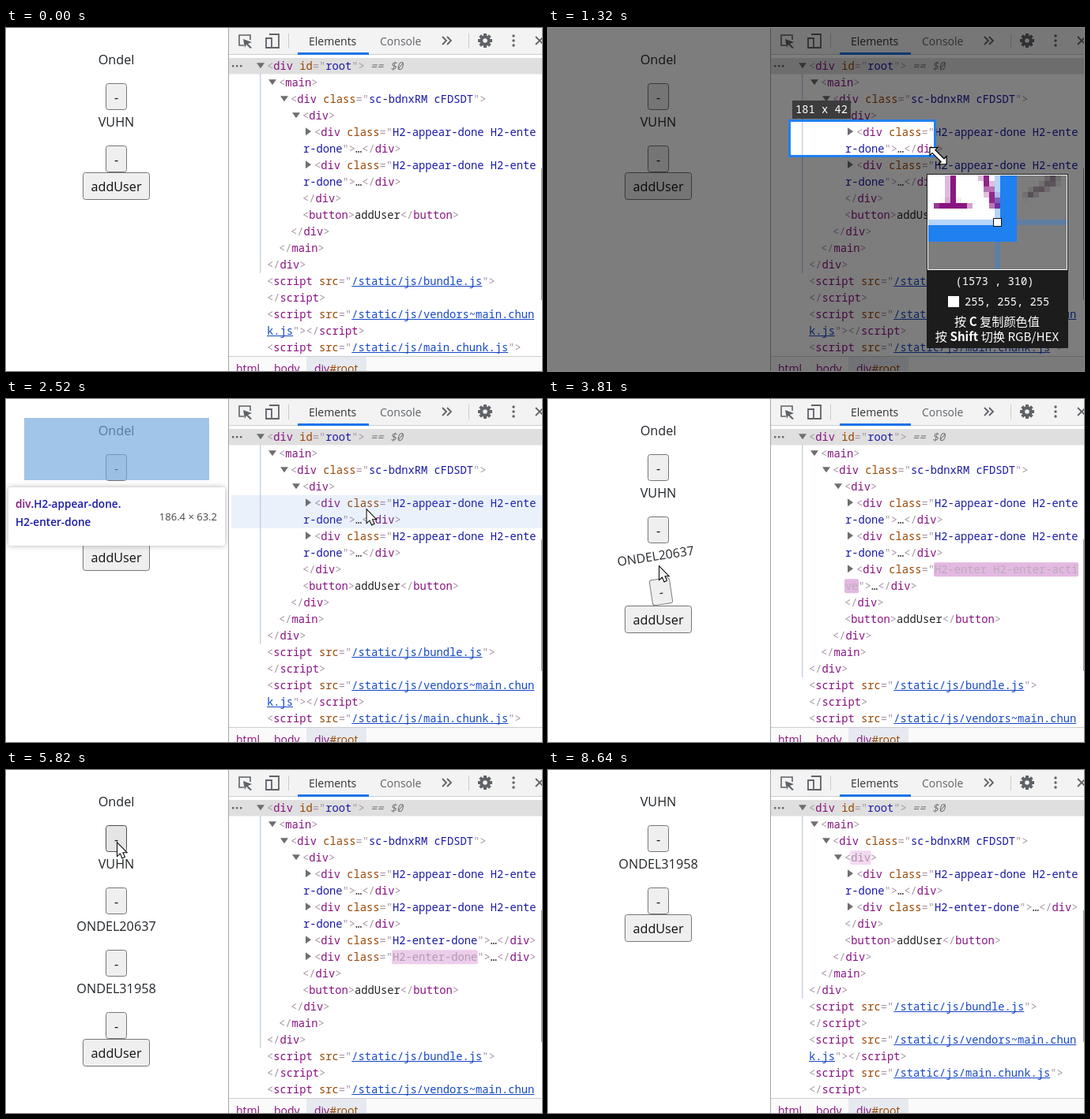
Recreate the animation shown at these times as an HTML page with a canvas. Size 678 by 435 pixels, loop 8.73 s.

```html
<!DOCTYPE html>
<html lang="en">
<head>
<meta charset="utf-8">
<title>List transitions</title>
<style>
html, body { margin: 0; width: 678px; height: 435px; overflow: hidden; background: #fff; }
canvas { display: block; }
</style>
</head>
<body>
<canvas id="stage" width="678" height="435"></canvas>
<script>
const cv = document.getElementById('stage'), g = cv.getContext('2d');
const LOOP = 8730, MOVE = 500, W = 678, H = 435;
const SANS = '"Open Sans", "Noto Sans", sans-serif';
const MONO = '13.75px "Noto Sans Mono", "DejaVu Sans Mono", monospace';
const CJK = '"Noto Sans CJK SC", "Noto Sans CJK", "Noto Sans", sans-serif';
const CH = 8.25, ROW = 21;
const MARK = '#a894a6', TAG = '#881280', ATTR = '#994500', VALUE = '#1a1aa6', LINK = '#1547c4';
const BLUE = '#1f80f0';

const users = [
  { name: 'Ondel', enter: -1e4, exit: 5967, cls: 'H2-appear-done H2-enter-done' },
  { name: 'VUHN', enter: -1e4, exit: 1e5, cls: 'H2-appear-done H2-enter-done' },
  { name: 'ONDEL20637', enter: 3323, exit: 7210, cls: 'H2-enter-done' },
  { name: 'ONDEL31958', enter: 4620, exit: 1e5, cls: 'H2-enter-done' }
];

// Pointer: time, x, y
const path = [
  [270, 560, 330], [760, 307, 119], [800, 307, 119], [870, 330, 124], [1840, 682, 207],
  [1900, 660, 200], [1960, 598, 191], [2250, 598, 191], [2420, 470, 141], [2680, 430, 141],
  [2910, 141, 213], [4150, 141, 213], [4450, 141, 280], [5130, 141, 280], [5600, 141, 93],
  [6810, 141, 93], [7150, 143, 157], [7710, 143, 157], [7930, 250, 217], [8060, 420, 172],
  [8330, 470, 172], [8460, 690, 172]
];

const clamp = (v, a = 0, b = 1) => Math.min(b, Math.max(a, v));
const lerp = (a, b, k) => a + (b - a) * k;
const mix = (a, b, k) => `rgb(${a.map((v, i) => Math.round(lerp(v, b[i], k)))})`;

// cubic-bezier(0, 0, .2, 1)
function easeOut(x) {
  let lo = 0, hi = 1;
  for (let i = 0; i < 24; i++) {
    const m = (lo + hi) / 2;
    if (.6 * m * m * (1 - m) + m ** 3 < clamp(x)) lo = m; else hi = m;
  }
  return lo * lo * (3 - 2 * lo);
}

function pointer(t) {
  let i = 0;
  while (i < path.length - 2 && t > path[i + 1][0]) i++;
  const [a, b] = [path[i], path[i + 1]], k = clamp((t - a[0]) / (b[0] - a[0])), s = k * k * (3 - 2 * k);
  return [lerp(a[1], b[1], s), lerp(a[2], b[2], s)];
}

function rect(x, y, w, h, fill) {
  g.fillStyle = fill;
  g.fillRect(x, y, w, h);
}

function round(x, y, w, h, r, fill, stroke) {
  g.beginPath();
  g.roundRect(x, y, w, h, r);
  g.fillStyle = fill;
  g.fill();
  if (stroke) { g.strokeStyle = stroke; g.lineWidth = 1; g.stroke(); }
}

function text(s, x, y, font, fill, align = 'left') {
  g.font = font;
  g.fillStyle = fill;
  g.textAlign = align;
  g.fillText(s, x, y);
}

function shape(d, x, y, fill, stroke, width = 1.3) {
  const p = new Path2D(d);
  g.save();
  g.translate(x, y);
  g.lineWidth = width;
  if (stroke) { g.strokeStyle = stroke; g.stroke(p); }
  if (fill) { g.fillStyle = fill; g.fill(p); }
  g.restore();
}

function button(label, x, y, w, h, over) {
  round(x + .5, y + .5, w - 1, h - 1, 3, over ? '#e5e5e5' : '#efefef', over ? '#4f4f4f' : '#767676');
  text(label, x + w / 2, y + h / 2 + 6.5, '16.2px ' + SANS, '#111', 'center');
}

function page(t, list, [px, py], live) {
  const over = (x, y, w, h) => live && px >= x && px < x + w && py >= y && py < y + h;
  list.forEach((u, i) => {
    const top = 24 + 79 * i, mid = top + 39.5;
    const k = t >= u.exit ? 1 - clamp((t - u.exit) / MOVE) : clamp((t - u.enter) / MOVE);
    g.save();
    g.globalAlpha = k;
    g.translate(140, mid);
    g.rotate(-2 * Math.PI * (1 - k));
    g.scale(k, k);
    g.translate(-140, -mid);
    text(u.name, 139.5, top + 22, '16.2px ' + SANS, '#212529', 'center');
    button('-', 126, top + 46, 27, 34, over(126, top + 46, 27, 34));
    g.restore();
  });
  const y = 25 + 79 * list.length;
  button('addUser', 97, y, 85, 35, over(97, y, 85, 35));
}

// Highlight of a freshly changed node: [background, text, alpha]
function flash(age) {
  if (age < 0 || age > 1400) return null;
  const k = easeOut(age / 1120);
  return [mix([158, 54, 153], [245, 219, 244], k), mix([255, 255, 255], [168, 148, 166], k),
    1 - easeOut((age - 1120) / 280)];
}

const open = (name, attr, value, style = {}, tagStyle = {}) => [['<', MARK], [name, TAG, tagStyle],
  ...(attr ? [[' ' + attr, ATTR], ['="', MARK], [value, style.link ? LINK : VALUE, style], ['"', MARK]] : []),
  ['>', MARK]];
const close = name => [['</', MARK], [name, TAG], ['>', MARK]];

function piece(s, x, y, color, { link, lit }) {
  const w = s.length * CH;
  if (lit) {
    g.globalAlpha = lit[2];
    round(x - 1, y - 9, w + 1.5, 18, 2, lit[0]);
    g.globalAlpha = 1;
    color = lit[1];
  }
  text(s, x, Math.round(y + 4.6), MONO, color);
  if (link) rect(x, Math.round(y + 6), w, 1, color);
}

// Draws one node with wrapping and returns the next row's y
function node(x, y, segs, arrow, hang = x, cols = 41) {
  if (arrow === 'v') shape('M-5-3H5L0 4Z', x - 8, y - 1, '#6e6e6e');
  if (arrow === '>') shape('M-3-5V5L4 0Z', x - 8, y - 1, '#6e6e6e');
  let c = 0, left = x;
  const wrap = () => { c = 0; left = hang; y += ROW; };
  segs.forEach(([s, color, style = {}], i) => {
    if (s === '</' && c + segs[i + 1][0].length + 3 > cols) wrap();
    while (s) {
      if (c >= cols) wrap();
      const part = s.slice(0, cols - c);
      piece(part, left + c * CH, y, color, style);
      c += part.length;
      s = s.slice(part.length);
    }
  });
  return y + ROW;
}

function tree(t, list, hover) {
  g.save();
  g.beginPath();
  g.rect(282, 36, 396, 377);
  g.clip();
  rect(282, 38, 396, 20.5, '#dfdfdf');
  for (const x of [287, 292, 297]) rect(x - 1, 47, 2.4, 2.4, '#666');
  let y = node(330, 48.3, open('div', 'id', 'root'), 'v');
  text('== $0', 461, 53, 'italic ' + MONO, '#777');
  y = node(345, y, open('main'), 'v');
  y = node(360, y, open('div', 'class', 'sc-bdnxRM cFDSDT'), 'v');
  const gone = Math.max(...users.map(u => u.exit + MOVE).filter(e => e <= t), -1e4);
  y = node(375, y, open('div', 0, 0, {}, { lit: flash(t - gone) }), 'v');
  list.forEach((u, i) => {
    let cls = u.cls, since = u.enter + MOVE, cols = 34;
    if (t >= u.exit) { cls = 'H2-exit H2-exit-active'; since = u.exit; cols = 33; }
    else if (t < since) { cls = 'H2-enter H2-enter-active'; since = u.enter; }
    const y0 = y, segs = [...open('div', 'class', cls, { lit: flash(t - since) }), ['…', '#222'], ...close('div')];
    y = node(390, y, segs, '>', 376, cols);
    if (i === hover) rect(285, y0 - 10.5, 393, y - y0, 'rgba(56,121,217,.1)');
  });
  y = node(375, y, close('div'));
  y = node(375, y, [...open('button'), ['addUser', '#222'], ...close('button')]);
  y = node(360, y, close('div'));
  y = node(345, y, close('main'));
  y = node(330, y, close('div'));
  rect(321, 58, 1.4, y - 10.5 - 58, '#c5d0e6');
  for (const file of ['bundle', 'vendors~main.chunk', 'main.chunk'])
    y = node(330, y, [...open('script', 'src', `/static/js/${file}.js`, { link: true }), ...close('script')]);
  g.restore();
}

function devtools(t, list, hover) {
  rect(281, 0, 397, H, '#fff');
  rect(281, 0, 397, 33, '#f3f3f3');
  rect(281, 33, 397, 1, '#cbcdd1');
  rect(369, 31, 90, 3, '#1a73e8');
  text('Elements', 383, 21.5, '14px ' + SANS, '#333');
  text('Console', 473, 21.5, '14px ' + SANS, '#5f6368');
  const ink = '#5f6368';
  shape('M-1 6H-7V-7H7V-1', 302, 16, null, ink, 1.6);
  shape('M-2-2L9 2 4 4 9 9 7 10 2 5 0 9Z', 302, 16, ink);
  shape('M-4-8H8V9H0M-8-3H-1V9H-8Z', 337, 16, null, ink, 1.8);
  shape('M-5-5L0 0-5 5M1-5L6 0 1 5', 557, 16, null, ink, 1.8);
  rect(357, 7, 1, 19, '#ccc');
  rect(585, 7, 1, 19, '#ccc');
  g.save();
  g.translate(606, 16);
  for (let i = 0; i < 8; i++) { rect(-2, -9, 4, 5, ink); g.rotate(Math.PI / 4); }
  g.restore();
  g.beginPath();
  g.arc(606, 16, 4.8, 0, 7);
  g.strokeStyle = ink;
  g.lineWidth = 4;
  g.stroke();
  for (const y of [10, 16, 22]) round(640.3, y - 1.7, 3.4, 3.4, 1.7, ink);
  shape('M-5-5L5 5M5-5L-5 5', 675, 16, null, ink, 1.8);

  tree(t, list, hover);
  rect(677, 178, 1, 167, '#9a9a9a');
  rect(281, 416, 397, 19, '#fafafa');
  rect(281, 416, 397, 1, '#cbcdd1');
  rect(380, 417, 76, 18, '#e6eaf0');
  text('html', 291, 436.5, '14px ' + SANS, TAG);
  text('body', 339, 436.5, '14px ' + SANS, TAG);
  text('div', 390, 436.5, '14px ' + SANS, TAG);
  const w = g.measureText('div').width;
  text('#root', 390 + w, 436.5, '14px ' + SANS, ATTR);
  rect(281, 0, 1, H, '#a3a5a8');
}

function tooltip(index, box, lines, textY) {
  const [x, y, w, h] = box, bold = '600 13.6px ' + SANS;
  rect(23, 24 + 79 * index, 234, 79, 'rgba(111,168,220,.66)');
  g.save();
  g.shadowColor = 'rgba(0,0,0,.3)';
  g.shadowBlur = 7;
  round(x, y, w, h, 3, '#fff');
  g.restore();
  lines.forEach((s, i) => {
    const yy = textY + 23 * i, tag = i ? '' : 'div';
    text(tag, x + 9, yy, bold, TAG);
    text(s, x + 9 + g.measureText(tag).width, yy, bold, VALUE);
  });
  text('186.4 × 63.2', x + w - 10, y + h / 2 + 5, '13px ' + SANS, '#444', 'right');
}

const tools = [
  'M-9-7H5V3H-9ZM9 3A6 6 0 1 1-3 3 6 6 0 1 1 9 3', 'M-9 5L-3-2 2 2 9-5', 'M-8 8L4-4M8-8L0-5 5 0Z',
  'M-8 8L-6 2 5-9 9-5-2 6ZM2-6L6-2', 'M-9 9L-1 8-6 3ZM-4 1L4-9 9-4-1 5Z', 'M-8-8H8V8H-8ZM-8-8H0V8H8V0H-8Z',
  'M-8-5V-8H8V-5M0-8V8M-3 8H3', 'M-8 3L2-8 9-2-1 8H-4Z', 'M-4-8L-8-4-4 0M-8-4H3Q8-4 8 6', 'M4-8L8-4 4 0M8-4H-3Q-8-4-8 6',
  'M-7-7L7 7M7-7L-7 7', 'M-8 8L-3 3M-7-1L1 7 2 2 8-3 3-8-2-2Z', 'M-8-8H5L8-5V8H-8ZM-4-8V-3H4V-8M-5 8V1H5V8'
];
const toolX = [131, 171, 211, 251, 291, 331, 371, 411, 458, 496, 541, 581, 621];

function toolbar(alpha) {
  g.globalAlpha = alpha;
  rect(110, 218, 568, 41, '#fff');
  rect(110, 218, 1, 41, '#7db4f5');
  rect(110, 258, 568, 1.5, '#3f8ff0');
  tools.forEach((d, i) => shape(d, toolX[i], 238, [4, 5, 7, 11].includes(i) ? 'rgba(40,40,40,.6)' : null, '#333', 1.7));
  g.globalAlpha = 1;
}

function richLine(parts, cx, y) {
  const fonts = parts.map((s, i) => `${i % 2 ? 'bold ' : ''}15.2px ${CJK}`);
  const widths = parts.map((s, i) => { g.font = fonts[i]; return g.measureText(s).width; });
  let x = cx - widths.reduce((a, b) => a + b) / 2;
  parts.forEach((s, i) => { text(s, x, y, fonts[i], '#fff'); x += widths[i]; });
}

function magnifier(cx, cy) {
  const x = Math.round(cx) - 9, y = Math.round(cy) + 24, px = Math.round(cx) - 1, py = Math.round(cy) - 1;
  rect(x, y, 179, 221, '#1c1c1c');
  rect(x + 1, y + 1, 177, 121, '#fff');
  rect(x + 2, y + 2, 175, 119, '#787878');
  g.imageSmoothingEnabled = false;
  g.drawImage(cv, px - 12, py - 8, 25, 17, x + 2, y + 2, 175, 119);
  rect(x + 2, y + 58, 175, 7, 'rgba(31,128,240,.33)');
  rect(x + 86, y + 2, 7, 119, 'rgba(31,128,240,.33)');
  rect(x + 84, y + 56, 11, 11, '#111');
  rect(x + 85, y + 57, 9, 9, '#fff');
  text(`(${px + 1086} , ${py + 150})`, x + 86, y + 141, MONO, '#fff', 'center');
  rect(x + 27, y + 155, 14, 14, '#fff');
  text('255, 255, 255', x + 48, y + 167, MONO, '#fff');
  richLine(['按 ', 'C', ' 复制颜色值'], x + 89, y + 193);
  richLine(['按 ', 'Shift', ' 切换 RGB/HEX'], x + 89, y + 212);
}

function capture(t, p) {
  const [x, y] = [307, 119], drag = t >= 800;
  const w = t > 1840 ? 375 : Math.round(p[0] - x), h = t > 1840 ? 88 : Math.round(p[1] - y);
  g.beginPath();
  g.rect(0, 0, W, H);
  if (drag) g.rect(x, y, w, h);
  g.fillStyle = 'rgba(0,0,0,.51)';
  g.fill('evenodd');
  if (drag) {
    g.strokeStyle = BLUE;
    g.lineWidth = 3;
    g.strokeRect(x - 1.5, y - 1.5, w + 3, h + 3);
    const label = `${w} x ${h}`;
    rect(309, 92, label.length * CH + 8, 23, '#3c3c3c');
    text(label, 313, 108, MONO, '#fff');
  }
  if (t > 1890) toolbar(clamp((t - 1890) / 180));
  if (t < 2055) magnifier(...pointer(Math.min(t, 1900)));
}

function cursor(t, [x, y]) {
  if (t >= 800 && t < 1870)
    shape('M-10-10H-2L-4.5-7.5 7.5 4.5 10 2V10H2L4.5 7.5-7.5-4.5-10-2Z', x + 6, y + 1, '#fff', '#000', 2.4);
  else if (t >= 1870 && t < 2250)
    shape('M0-14L5-8H2V-2H8V-5L14 0 8 5V2H2V8H5L0 14-5 8H-2V2H-8V5L-14 0-8-5V-2H-2V-8H-5Z', x, y, '#fff', '#000', 2.2);
  else
    shape('M0 0V15.5L3.6 12.2 6.2 18.3 8.8 17.1 6.2 11.2H11Z', x, y, '#fff', '#000', 2);
}

function draw(t) {
  const p = pointer(t), shown = t >= 270 && t < 8460, busy = t >= 270 && t < 2250;
  const list = users.filter(u => t >= u.enter && t < u.exit + MOVE);
  const first = t >= 2400 && t < 2700, last = t >= 8050 && t < 8370;
  rect(0, 0, W, H, '#fff');
  page(t, list, p, shown && !busy);
  if (first) tooltip(0, [3, 112, 274, 74], ['.H2-appear-done.', 'H2-enter-done'], 138);
  if (last) tooltip(1, [23, 57, 234, 38], ['.H2-enter-done'], 81);
  devtools(t, list, first ? 0 : last ? 1 : -1);
  if (busy) capture(t, p);
  if (shown) cursor(t, p);
}

const start = performance.now();
function tick() {
  draw((performance.now() - start) % LOOP);
  requestAnimationFrame(tick);
}
tick();
</script>
</body>
</html>
```
